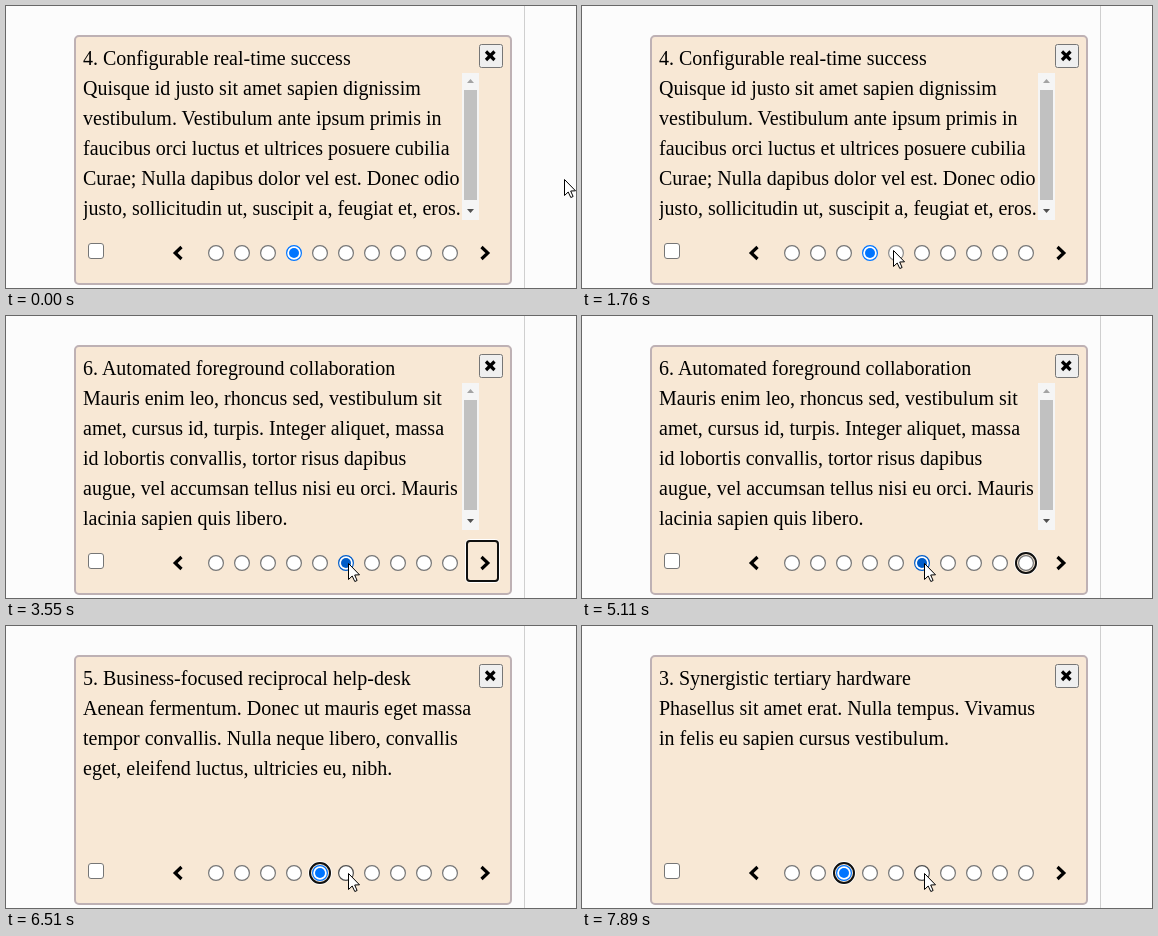
Write an HTML page with a canvas that moves like this. It is 570 px wide and 282 px high and loops after 8 s.

```html
<!DOCTYPE html>
<html lang="en">
<head>
<meta charset="utf-8">
<title>Paged card</title>
<style>
html, body { margin: 0; width: 570px; height: 282px; overflow: hidden; background: #fcfcfc; }
body { position: relative; font: 20px/30px "Liberation Serif", "Times New Roman", Times, serif; color: #000; }
body > * { position: absolute; }
#rule { left: 518px; top: 0; width: 1px; height: 282px; background: #cfcfcf; }
#card { left: 68px; top: 29px; width: 434px; height: 246px; border: 2px solid #beb1b4; border-radius: 5px; background: #f8e8d5; }
#title, #body { left: 77px; white-space: pre; overflow: hidden; }
#title { top: 37px; height: 30px; width: 390px; }
#body { top: 67px; height: 147px; width: 396px; }
canvas { left: 0; top: 0; }
</style>
</head>
<body>
<div id="rule"></div>
<div id="card"></div>
<div id="title"></div>
<div id="body"></div>
<canvas id="stage" width="570" height="282"></canvas>
<script>
const LOOP = 8000, ROW = 247, NEXT = 'next';
const titleBox = document.getElementById('title');
const bodyBox = document.getElementById('body');
const ctx = document.getElementById('stage').getContext('2d');

const pages = {
  3: ['Synergistic tertiary hardware',
    'Phasellus sit amet erat. Nulla tempus. Vivamus',
    'in felis eu sapien cursus vestibulum.'],
  4: ['Configurable real-time success',
    'Quisque id justo sit amet sapien dignissim',
    'vestibulum. Vestibulum ante ipsum primis in',
    'faucibus orci luctus et ultrices posuere cubilia',
    'Curae; Nulla dapibus dolor vel est. Donec odio',
    'justo, sollicitudin ut, suscipit a, feugiat et, eros.'],
  5: ['Business-focused reciprocal help-desk',
    'Aenean fermentum. Donec ut mauris eget massa',
    'tempor convallis. Nulla neque libero, convallis',
    'eget, eleifend luctus, ultricies eu, nibh.'],
  6: ['Automated foreground collaboration',
    'Mauris enim leo, rhoncus sed, vestibulum sit',
    'amet, cursus id, turpis. Integer aliquet, massa',
    'id lobortis convallis, tortor risus dapibus',
    'augue, vel accumsan tellus nisi eu orci. Mauris',
    'lacinia sapien quis libero.'],
  7: ['Customizable didactic software',
    'Proin interdum mauris non ligula pellentesque',
    'ultrices. Phasellus id sapien in sapien iaculis',
    'congue. Vivamus metus arcu, adipiscing',
    'molestie, hendrerit at, vulputate vitae, nisl.'],
  8: ['Streamlined modular interface',
    'Duis bibendum, felis sed interdum venenatis,',
    'turpis enim blandit mi, in porttitor pede justo',
    'eu massa. Donec dapibus.'],
  9: ['Networked optimal framework',
    'Cras mi pede, malesuada in, imperdiet et,',
    'commodo vulputate, justo. In blandit ultrices',
    'enim. Lorem ipsum dolor sit amet, consectetuer',
    'adipiscing elit. Proin interdum mauris non',
    'ligula pellentesque ultrices. Phasellus id',
    'sapien in sapien iaculis congue.']
};

// Each step changes only the listed parts of the state.
const steps = [
  [0, { page: 4, at: [558, 173], focus: 0, press: 0 }],
  [530, { at: [554, 179] }],
  [680, { at: [548, 185] }],
  [800, { at: [539, 192] }],
  [950, { at: [474, 195] }],
  [1070, { at: [408, 205] }],
  [1220, { at: [345, 228] }],
  [1340, { at: [309, 239] }],
  [1490, { at: [311, 244] }],
  [1760, { press: 5 }],
  [1880, { page: 5, press: 0 }],
  [2030, { at: [352, 250] }],
  [2440, { at: [347, 247] }],
  [2590, { press: 6 }],
  [2740, { page: 6, press: 0 }],
  [2990, { at: [344, 247] }],
  [3140, { at: [342, 247] }],
  [3550, { focus: NEXT }],
  [5110, { focus: 10 }],
  [5670, { page: 9, focus: 9 }],
  [5940, { page: 8, focus: 8 }],
  [6070, { page: 7, focus: 7 }],
  [6350, { page: 6, focus: 6 }],
  [6510, { page: 5, focus: 5 }],
  [6780, { page: 4, focus: 4 }],
  [6910, { page: 3, focus: 3 }],
  [7620, { page: 4, focus: 4 }],
  [7890, { page: 3, focus: 3 }]
];

function stateAt(time) {
  const state = {};
  for (const [start, change] of steps) {
    if (start <= time) Object.assign(state, change);
  }
  return state;
}

function disc(x, y, r, color) {
  ctx.fillStyle = color;
  ctx.beginPath();
  ctx.arc(x, y, r, 0, Math.PI * 2);
  ctx.fill();
}

function ring(x, y, r, width, color) {
  ctx.strokeStyle = color;
  ctx.lineWidth = width;
  ctx.beginPath();
  ctx.arc(x, y, r, 0, Math.PI * 2);
  ctx.stroke();
}

function roundBox(x, y, w, h, r, line, width, fill) {
  ctx.beginPath();
  ctx.roundRect(x, y, w, h, r);
  if (fill) {
    ctx.fillStyle = fill;
    ctx.fill();
  }
  ctx.strokeStyle = line;
  ctx.lineWidth = width;
  ctx.stroke();
}

function trace(points) {
  ctx.beginPath();
  points.forEach(([x, y]) => ctx.lineTo(x, y));
}

function thickLine(points, width) {
  trace(points);
  ctx.strokeStyle = '#000';
  ctx.lineWidth = width;
  ctx.stroke();
}

function triangle(y, dir, color) {
  trace([[461, y], [468, y], [464.5, y + 4 * dir]]);
  ctx.fillStyle = color;
  ctx.fill();
}

function drawScrollbar(lines) {
  const view = 147, track = 113;
  ctx.fillStyle = '#f5f5f5';
  ctx.fillRect(456, 67, 17, view);
  ctx.fillStyle = '#c1c1c1';
  ctx.fillRect(458, 84, 13, Math.floor(track * view / (lines * 30)));
  triangle(77, -1, '#a3a3a3');
  triangle(203, 1, '#505050');
}

function drawRadio(n, state) {
  const x = 184 + 26 * n, [mx, my] = state.at;
  const over = Math.abs(mx - x) <= 8 && Math.abs(my - ROW) <= 8;
  const on = state.page === n;
  let color = on ? '#0075ff' : '#767676';
  if (over) color = on ? '#005cc8' : '#4f4f4f';
  if (state.press === n) color = on ? '#3793ff' : '#8d8d8d';
  disc(x, ROW, 7.5, '#fff');
  ring(x, ROW, 7.4, 1.2, color);
  if (on) disc(x, ROW, 5, color);
  if (state.focus === n) {
    ring(x, ROW, 11.5, 1, '#fff');
    ring(x, ROW, 10, 2, '#101010');
  }
}

function drawControls(state) {
  roundBox(473.5, 38.5, 23, 23, 2, '#767676', 1, '#efefef');
  thickLine([[480, 45.5], [488.5, 54]], 3.2);
  thickLine([[488.5, 45.5], [480, 54]], 3.2);
  roundBox(82.5, 237.5, 15, 15, 2.5, '#767676', 1, '#fff');
  thickLine([[175.5, 241], [169.2, 247], [175.5, 253]], 3.2);
  thickLine([[475.5, 241], [481.8, 247], [475.5, 253]], 3.2);
  for (let n = 1; n <= 10; n++) drawRadio(n, state);
  if (state.focus === NEXT) {
    roundBox(459.5, 223.5, 34, 43, 4, '#fff', 1);
    roundBox(461, 225, 31, 40, 3, '#101010', 2);
  }
}

function drawPointer([x, y]) {
  ctx.save();
  ctx.translate(x + 0.5, y + 0.5);
  trace([[0, 0], [0, 16], [3.7, 12.5], [6.3, 18], [8.6, 17], [6.2, 11.5], [11, 11.3]]);
  ctx.closePath();
  ctx.fillStyle = '#fff';
  ctx.fill();
  ctx.strokeStyle = '#000';
  ctx.lineWidth = 1;
  ctx.stroke();
  ctx.restore();
}

let shown = 0;
function showPage(n) {
  if (n === shown) return;
  const [title, ...lines] = pages[n];
  titleBox.textContent = n + '. ' + title;
  bodyBox.textContent = lines.join('\n');
  shown = n;
}

function draw(time) {
  const state = stateAt(time);
  const lines = pages[state.page].length - 1;
  showPage(state.page);
  ctx.clearRect(0, 0, 570, 282);
  if (lines > 4) drawScrollbar(lines);
  drawControls(state);
  drawPointer(state.at);
}

const begin = performance.now();
function tick() {
  draw((performance.now() - begin) % LOOP);
  requestAnimationFrame(tick);
}
tick();
</script>
</body>
</html>
```
